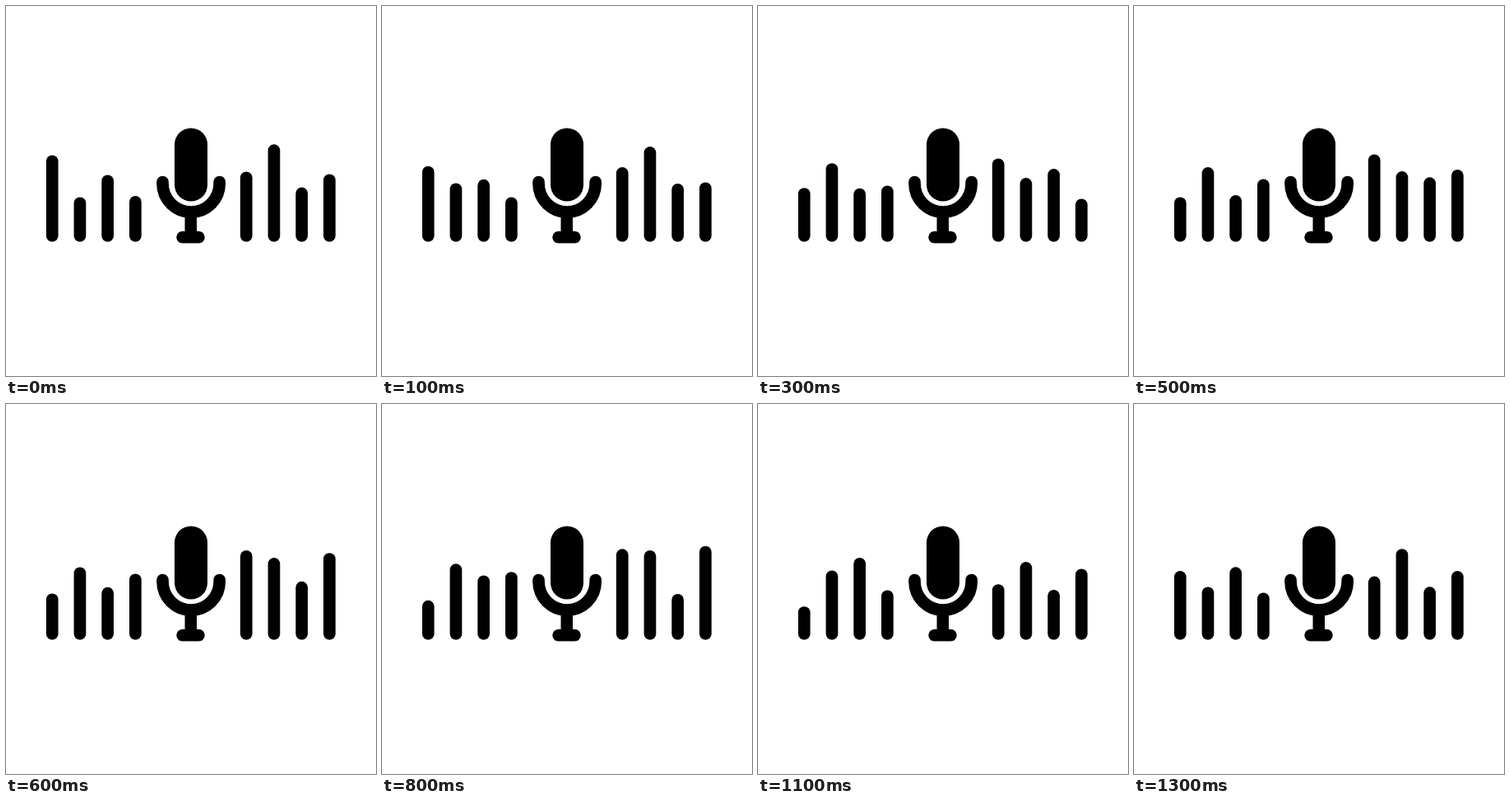
Recreate the animation shown at these times as an HTML page. Size 450x450 px, loop 1.4 s.

```html
<!DOCTYPE html>
<html lang="en">
<head>
<meta charset="utf-8">
<title>Voice levels</title>
<style>
  html, body { margin: 0; width: 100%; height: 100%; overflow: hidden; background: #fff; }
  svg { display: block; width: 100vw; height: 100vh; }
  .line { fill: none; stroke: #000; stroke-width: 14.7; stroke-linecap: round; }
</style>
</head>
<body>
<svg viewBox="0 0 450 450">
  <rect x="205" y="148.5" width="40" height="89" rx="20"/>
  <path class="line" d="M190.5 214V216A34.6 34.6 0 0 0 259.7 216V214"/>
  <rect x="217.5" y="254" width="14.5" height="24"/>
  <rect x="207.3" y="274" width="34.4" height="14.5" rx="7.25"/>
  <g id="bars" class="line"></g>
</svg>
<script>
const STEP = 100, STEPS = 14;
const LEFT = 56.2, GAP = 33.72, MIC_SLOTS = 3;
const BASE = 279.5, CAP = 7.8;

// Turning points of each bar's top: [step, y], joined by straight lines around the loop.
const TURNS = [
  [[0, 181], [4, 234], [6, 230], [10.8, 250]],
  [[0, 232], [2.5, 189.5], [6, 198], [9.8, 190]],
  [[0, 205], [4.8, 231], [11.2, 185]],
  [[1, 232], [3, 218], [7.5, 200], [11, 226]],
  [[0, 201], [3, 185], [7.8, 173], [11.3, 223]],
  [[0.6, 163], [3.6, 220], [7.2, 170], [10.2, 198]],
  [[0.6, 219], [3.3, 195], [9.2, 239.5], [11, 225.5]],
  [[0, 204], [3, 234], [7, 163], [11, 200]]
];

const group = document.getElementById("bars");
const lines = TURNS.map((_, i) => {
  const x = LEFT + GAP * (i < 4 ? i : i + MIC_SLOTS);
  const el = document.createElementNS("http://www.w3.org/2000/svg", "line");
  el.setAttribute("x1", x);
  el.setAttribute("x2", x);
  el.setAttribute("y2", BASE);
  return group.appendChild(el);
});

const wrap = s => (s + STEPS) % STEPS;

function topAt(turns, step) {
  const next = turns.findIndex(([s]) => s > step);
  const [s1, y1] = turns[Math.max(next, 0)];
  const [s0, y0] = turns.at(next < 0 ? -1 : next - 1);
  return y0 + (y1 - y0) * wrap(step - s0) / wrap(s1 - s0);
}

function draw(time) {
  const step = Math.floor(time / STEP) % STEPS;
  lines.forEach((el, i) => el.setAttribute("y1", topAt(TURNS[i], step) + CAP));
}

const start = performance.now();
function tick() {
  draw(performance.now() - start);
  requestAnimationFrame(tick);
}
tick();
</script>
</body>
</html>
```
